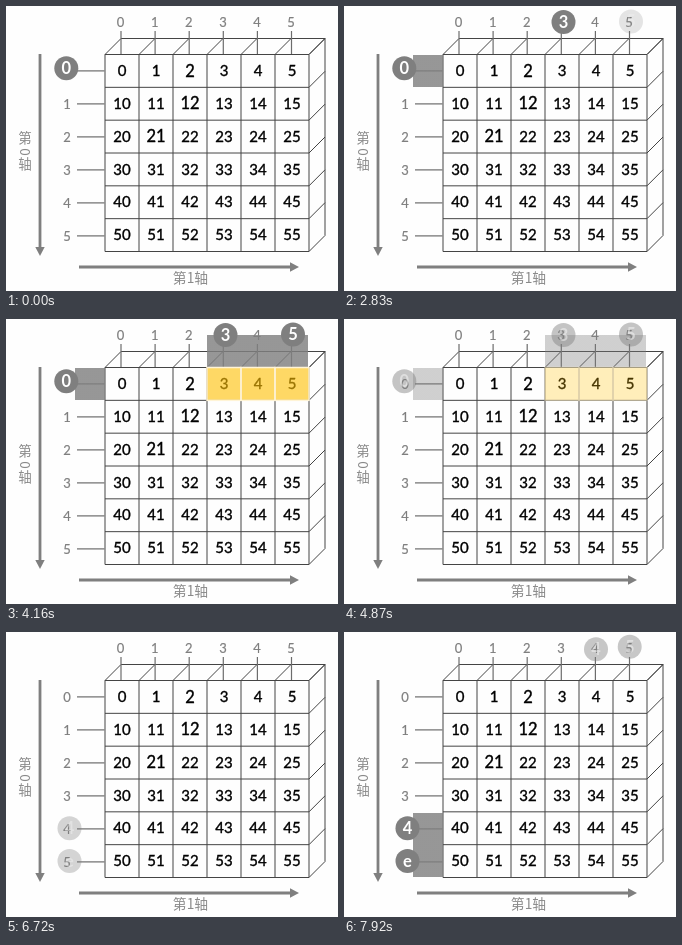
These frames come from a looping animation (332 px wide and 285 px high, 8000 ms). An HTML page with a canvas:

```html
<!DOCTYPE html>
<html lang="zh">
<head>
<meta charset="utf-8">
<title>Array slicing</title>
<style>
html, body { margin: 0; width: 100%; height: 100%; overflow: hidden; background: #fefefe; }
canvas { display: block; width: 332px; height: 285px; }
</style>
</head>
<body>
<canvas id="stage"></canvas>
<script>
const W = 332, H = 285, LOOP = 8000;
const LEFT = 99, TOP = 48.5, CW = 34, CH = 197 / 6, N = 6;
const DX = 16, DY = -16;
const PAPER = '#fefefe', GREY = '#7f7f7f', PALE = '#8a8a8a', INK = '#444', TICK = '#6c6c6c';
const DIGITS = 'Lato, "Open Sans", sans-serif';
const HAN = '"Noto Sans CJK SC", "Noto Sans CJK", sans-serif';

const canvas = document.getElementById('stage');
const ctx = canvas.getContext('2d');
const dpr = window.devicePixelRatio || 1;
canvas.width = W * dpr;
canvas.height = H * dpr;

const colX = i => LEFT + i * CW;
const rowY = i => TOP + i * CH;

// Value of the last [time, value] key reached.
function hold(t, keys) {
  let v = 0;
  for (const [at, value] of keys) if (t >= at) v = value;
  return v;
}

function text(s, x, y, size, color, { weight = 400, family = DIGITS, heft = 0 } = {}) {
  ctx.font = `${weight} ${size}px ${family}`;
  ctx.fillStyle = color;
  ctx.textAlign = 'center';
  ctx.textBaseline = 'alphabetic';
  ctx.fillText(s, x, y + size * 0.36);
  if (heft) {
    ctx.strokeStyle = color;
    ctx.lineWidth = heft;
    ctx.strokeText(s, x, y + size * 0.36);
  }
}

function line(x1, y1, x2, y2, color = INK, width = 1) {
  ctx.strokeStyle = color;
  ctx.lineWidth = width;
  ctx.beginPath();
  ctx.moveTo(x1, y1);
  ctx.lineTo(x2, y2);
  ctx.stroke();
}

function arrow(x, y, length, angle) {
  ctx.save();
  ctx.translate(x, y);
  ctx.rotate(angle);
  line(0, 0, length - 7, 0, GREY, 2.8);
  ctx.fillStyle = GREY;
  ctx.beginPath();
  ctx.moveTo(length - 9, -4.7);
  ctx.lineTo(length, 0);
  ctx.lineTo(length - 9, 4.7);
  ctx.fill();
  ctx.restore();
}

function cube() {
  const right = colX(N), bottom = rowY(N);
  for (let i = 0; i <= N; i++) {
    const x = colX(i), y = rowY(i);
    line(x, TOP, x, bottom);
    line(LEFT, y, right, y);
    line(x, TOP, x + DX, TOP + DY);
    line(right, y, right + DX, y + DY);
  }
  line(LEFT + DX, TOP + DY, right + DX, TOP + DY);
  line(right + DX, TOP + DY, right + DX, bottom + DY);

  for (let r = 0; r < N; r++) {
    for (let c = 0; c < N; c++) {
      const n = r * 10 + c;
      const big = n === 2 || n === 12 || n === 21;
      text(String(n), colX(c + 0.5), rowY(r + 0.5) - 0.3, big ? 16.5 : 15, '#000', { heft: 0.35 });
    }
  }
}

function axes() {
  for (let i = 0; i < N; i++) {
    const x = 115 + i * 34.1, y = 64.9 + i * 33;
    line(x, 25, x, 48, TICK, 1.2);
    line(71, y, 98.5, y, TICK, 1.2);
    text(i, x - 0.4, 16, 13, GREY, { heft: 0.2 });
    text(i, 61, y + 0.9, 13, GREY, { heft: 0.2 });
  }
  arrow(34, 48, 202, Math.PI / 2);
  arrow(73, 261, 220, 0);
  const han = { weight: 300, family: HAN };
  text('第1轴', 184.5, 272, 13.8, PALE, han);

  // Vertical setting: upright Han, sideways digit.
  text('第', 19, 132.5, 13.5, PALE, han);
  text('轴', 19, 158.5, 13.5, PALE, han);
  ctx.save();
  ctx.translate(19, 146);
  ctx.rotate(Math.PI / 2);
  text('0', 0, 0, 13.5, PALE, han);
  ctx.restore();
}

// Soft-edged reveal from the left, or from the top when down is set.
function wipe(x, y, w, h, p, alpha = 1, down = false) {
  if (!p || !alpha) return;
  const soft = 0.25;
  const front = p * (1 + soft), tail = front - soft;
  const at = k => down ? [x, y + h * k] : [x + w * k, y];
  const g = ctx.createLinearGradient(...at(tail), ...at(front));
  g.addColorStop(0, 'rgba(128,128,128,.82)');
  g.addColorStop(1, 'rgba(128,128,128,0)');
  ctx.globalAlpha = alpha;
  ctx.fillStyle = g;
  ctx.fillRect(x, y, w, h);
  ctx.globalAlpha = 1;
}

// Yellow cells whose pale borders cover the grid lines.
function highlight(row, from, to, alpha) {
  if (!alpha) return;
  ctx.globalAlpha = alpha;
  for (let c = from; c <= to; c++) {
    ctx.fillStyle = 'rgba(255,192,0,.6)';
    ctx.fillRect(colX(c), rowY(row), CW, CH);
  }
  ctx.strokeStyle = '#fff4d6';
  ctx.lineWidth = 1.5;
  for (let c = from; c <= to; c++) ctx.strokeRect(colX(c), rowY(row), CW, CH);
  ctx.globalAlpha = 1;
}

function badge(s, x, y, alpha) {
  if (!alpha) return;
  ctx.globalAlpha = alpha;
  ctx.fillStyle = GREY;
  ctx.beginPath();
  ctx.arc(x, y, 12, 0, Math.PI * 2);
  ctx.fill();
  text(s, x, y, 16.5, '#fff', { weight: 700 });
  ctx.globalAlpha = 1;
}

function draw(t) {
  ctx.setTransform(dpr, 0, 0, dpr, 0, 0);
  ctx.fillStyle = PAPER;
  ctx.fillRect(0, 0, W, H);
  cube();
  axes();

  const out = hold(t, [[0, 1], [4720, 0.75], [4870, 0.45], [4990, 0.2], [5140, 0]]);
  const three = hold(t, [[1850, 0.27], [1970, 0.5], [2120, 0.75], [2250, 1]]);
  const five = hold(t, [[2830, 0.2], [2950, 0.45], [3100, 0.7], [3220, 0.95], [3370, 1]]);
  const rowWipe = hold(t, [[120, 0.33], [240, 0.67], [360, 1]]);
  const colWipe = hold(t, [[3370, 0.25], [3490, 0.5], [3610, 0.75], [3740, 1]]);
  const cells = hold(t, [[3740, 0.2], [3880, 0.5], [4010, 0.8], [4160, 1]]);
  const rows = hold(t, [[6720, 0.33], [6870, 0.55], [7020, 0.8], [7140, 1]]);
  const rowsWipe = hold(t, [[7140, 0.25], [7260, 0.5], [7410, 0.75], [7530, 1]]);
  const cols = hold(t, [[7800, 0.2], [7920, 0.43]]);

  wipe(69, 49, 30, 32, rowWipe, out);
  wipe(201, 16, 101, 32, colWipe, out);
  highlight(0, 3, 5, cells * out);
  badge('0', 60.3, 62.3, out);
  badge('3', 219.5, 16, three * out);
  badge('5', 287, 15.5, five * out);

  wipe(69, 181, 30, 64, rowsWipe, 1, true);
  badge('4', 63.5, 196.3, rows);
  badge('e', 63.5, 229, rows);
  badge('4', 252, 17.3, cols);
  badge('5', 285.7, 14.7, cols);
}

const start = performance.now();
function tick() {
  draw((performance.now() - start) % LOOP);
  requestAnimationFrame(tick);
}
tick();
</script>
</body>
</html>
```
